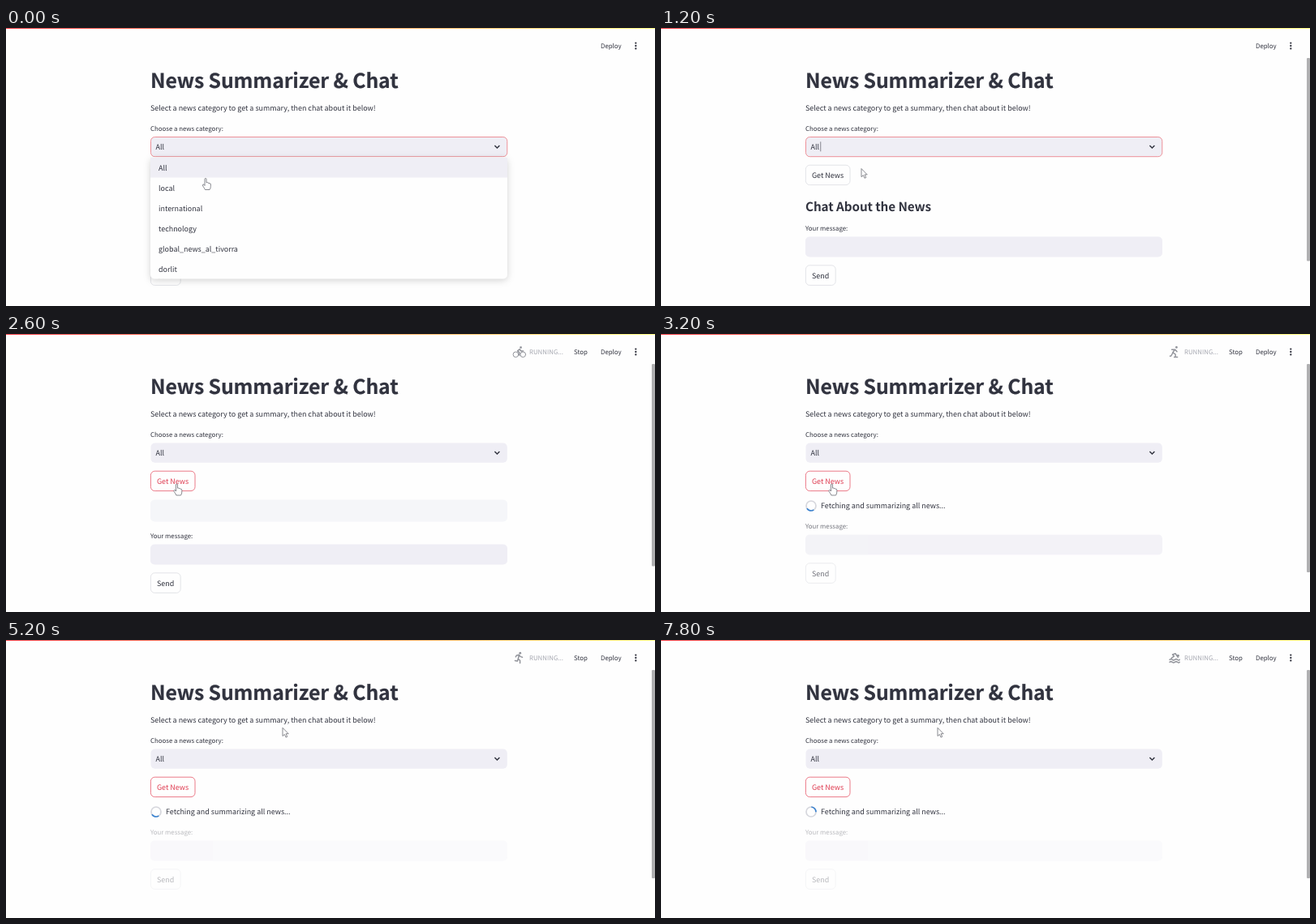
Write an HTML page that moves like this. It is 800x343 px and loops after 8000 ms.

```html
<!DOCTYPE html>
<html lang="en">
<head>
<meta charset="utf-8">
<title>News Summarizer &amp; Chat</title>
<style>
html, body { margin: 0; width: 100%; height: 100%; overflow: hidden; background: #fefefe; }
svg { display: block; width: 100%; height: 100%; }
text {
  font-family: "Noto Sans CJK JP", "Noto Sans CJK SC", "Noto Sans CJK", "Open Sans", sans-serif;
  font-size: 8.95px; fill: #31333f; text-rendering: geometricPrecision; white-space: pre;
}
.small { font-size: 7.83px; }
.title { font-size: 24.8px; font-weight: 700; letter-spacing: -.005em; stroke: #31333f; stroke-width: .2; }
.heading { font-size: 15.25px; font-weight: 600; letter-spacing: -.005em; }
.field { fill: #efeef5; }
.button { fill: #fefefe; stroke: #dcdde2; stroke-width: .8; }
.focus .field { stroke: #ec868e; stroke-width: .9; }
.hot .button { stroke: #e8596a; }
.hot text { fill: #df3d52; }
.menu { filter: drop-shadow(0 2.5px 4px rgba(0, 0, 0, .17)); }
.icon path { fill: none; stroke: #92949b; stroke-width: 1.5; stroke-linecap: round; stroke-linejoin: round; }
.icon .thin { stroke-width: 1; }
.icon circle { fill: #92949b; }
.pointer path { fill: #fff; stroke: #6b6c74; stroke-width: .8; stroke-linejoin: round; }
</style>
</head>
<body>
<svg viewBox="0 0 800 343" preserveAspectRatio="none">
  <defs>
    <linearGradient id="rainbow"><stop stop-color="#f5434b"/><stop offset="1" stop-color="#fffd80"/></linearGradient>
  </defs>
  <rect width="800" height="1" fill="url(#rainbow)"/>
  <text class="small" x="733" y="25">Deploy</text>
  <g fill="#31333f">
    <circle cx="776.3" cy="18.6" r="1.15"/><circle cx="776.3" cy="22" r="1.15"/><circle cx="776.3" cy="25.4" r="1.15"/>
  </g>
  <rect id="scrollbar" x="796" y="37" width="4" height="250" rx="1" fill="#b0b0b2"/>

  <g id="status">
    <g class="icon" id="bike">
      <path class="thin" d="M631.7 25.3a3.3 3.3 0 1 0-6.6 0a3.3 3.3 0 1 0 6.6 0M640.6 25.3a3.3 3.3 0 1 0-6.6 0a3.3 3.3 0 1 0 6.6 0"/>
      <path d="M632.8 26.2v-3.3l-2.2-2 2.4-2 2.2 2.2h2.4"/><circle cx="634.6" cy="16.6" r="1.4"/>
    </g>
    <g class="icon" id="runner">
      <path d="M628.3 20.8l1-1.8 3.3-.8-1.3 5 2.3 2v3.2M632.6 18.5c.8 1.7 2 2.6 3.9 2.8M631.2 23.4l-.8 2.5-3-.5"/>
      <circle cx="633.8" cy="16.2" r="1.4"/>
    </g>
    <g class="icon" id="swimmer">
      <path d="M627 24.2q1.6-1.4 3.2 0t3.2 0 3.2 0 2.6 0M627 27.3q1.6-1.4 3.2 0t3.2 0 3.2 0 2.6 0M629.5 22.2l3-2.2-2-2 3.6-1.2 3.2 4.6"/>
      <circle cx="637.4" cy="19.3" r="1.5"/>
    </g>
    <g class="icon" id="skater">
      <path d="M629.6 19.2h3.8l-2.5 3.6 3.2 2.2v3.6M634 19.5l2 2.3M631 23l-2.2 4-1.3.3M632.6 28.6h4"/>
      <circle cx="635.4" cy="16.4" r="1.4"/>
    </g>
    <text class="small" x="645" y="25" style="fill:#a5a7b0">RUNNING...</text>
    <text class="small" x="700" y="25">Stop</text>
  </g>

  <text class="title" x="178" y="73.8">News Summarizer &amp; Chat</text>
  <text x="178" y="101.6">Select a news category to get a summary, then chat about it below!</text>
  <text class="small" x="178" y="127">Choose a news category:</text>
  <g id="select">
    <rect class="field" x="178.5" y="134.5" width="439.3" height="24.2" rx="5"/>
    <text x="184.6" y="149.8">All</text>
    <path d="M602.4 145l3 3 3-3" fill="none" stroke="#31333f" stroke-width="1.4"/>
  </g>
  <rect id="caret" x="196.4" y="140.3" width=".8" height="12" fill="#6b6c74"/>

  <g id="getNews">
    <rect class="button" x="178.4" y="169.2" width="54.6" height="24.4" rx="5"/>
    <text x="185.9" y="184.6">Get News</text>
  </g>

  <text class="heading" id="heading" x="178" y="225.8">Chat About the News</text>
  <rect id="skeleton" x="178" y="204.5" width="440" height="27" rx="5" fill="#f5f6f9"/>
  <g id="spinner">
    <circle cx="185" cy="212" r="6" fill="none" stroke="#d6d7dd" stroke-width="1.7"/>
    <path id="arc" d="M189.24 207.76A6 6 0 0 1 189.24 216.24" fill="none" stroke="#3b83d0" stroke-width="1.7"/>
    <text x="197" y="215.4">Fetching and summarizing all news...</text>
  </g>

  <g id="form">
    <text class="small" x="178" y="250.4">Your message:</text>
    <rect class="field" x="178" y="257.5" width="440" height="25" rx="5"/>
    <rect class="button" x="178.4" y="292.8" width="36.8" height="24.6" rx="5"/>
    <text x="186" y="308.5">Send</text>
  </g>

  <g id="menu">
    <rect class="menu" x="178" y="159.5" width="440" height="150" rx="5" fill="#fefefe"/>
    <rect x="178" y="160" width="440" height="24.5" fill="#efeef5"/>
  </g>

  <g class="pointer" id="arrow"><path d="M0 0V10.2L2.4 8.1 4 11.8 5.7 11 4.1 7.4H7.2Z"/></g>
  <g class="pointer" id="hand">
    <path d="M-1 9V1Q-1 0 0 0T1 1V5.2Q2.6 4.4 3 5.8 4.4 5 4.8 6.4 6.3 5.9 6.3 7.4V10Q6.3 12 5 14H-.6Q-1.4 12-3.2 9.6-4.2 8-3 7.4-2 7.2-1 9Z"/>
  </g>
</svg>
<script>
const LOOP = 8000, STEP = 200;
const OPTIONS = ["All", "local", "international", "technology", "global_news_al_tivorra", "dorlit"];
const ICONS = ["runner", "bike", "runner", "swimmer", "skater", "bike"];
const POINTER_KEYS = [
  [0, 246, 185.5], [200, 246, 185.5], [600, 247, 173.5], [1400, 247, 173.5],
  [2000, 210.5, 185], [3400, 210.5, 185], [4000, 341, 108.3], [LOOP, 341, 108.3]
];

const get = id => document.getElementById(id);
const show = (id, on) => { get(id).style.display = on ? "" : "none"; };
const move = (id, x, y) => get(id).setAttribute("transform", `translate(${x} ${y})`);
const ramp = (t, from, to) => Math.min(1, Math.max(0, (t - from) / (to - from)));

OPTIONS.forEach((label, i) => {
  const item = document.createElementNS(get("menu").namespaceURI, "text");
  item.setAttribute("x", 188);
  item.setAttribute("y", 175.6 + 25 * i);
  item.textContent = label;
  get("menu").append(item);
});

function pointerAt(t) {
  const i = POINTER_KEYS.findIndex(key => key[0] > t);
  const [t0, x0, y0] = POINTER_KEYS[i - 1], [t1, x1, y1] = POINTER_KEYS[i];
  const k = ramp(t, t0, t1), eased = k * k * (3 - 2 * k);
  return [x0 + (x1 - x0) * eased, y0 + (y1 - y0) * eased];
}

function render(t) {
  const menuOpen = t < 600, running = t >= 2400, skeleton = t >= 2600 && t < 2800, fetching = t >= 2800;
  const [x, y] = pointerAt(t);
  const overButton = x > 178 && x < 233 && y > 169 && y < 194;

  show("menu", menuOpen);
  show("scrollbar", !menuOpen);
  get("scrollbar").setAttribute("height", fetching ? 257 : skeleton ? 249.5 : 250.5);
  get("select").classList.toggle("focus", t < 2200);
  show("caret", t >= 1000 && t < 1600);
  get("getNews").classList.toggle("hot", overButton || running);

  show("heading", t < 2600);
  show("skeleton", skeleton);
  show("spinner", fetching);
  get("arc").setAttribute("transform", `rotate(${t * .36 + 30} 185 212)`);
  move("form", 0, fetching ? -10 : skeleton ? 2 : 0);
  get("form").style.opacity = 1 - .67 * ramp(t, 2800, 3600);

  show("status", running);
  const icon = ICONS[Math.floor(t / STEP) % ICONS.length];
  new Set(ICONS).forEach(id => show(id, id === icon));

  const hand = menuOpen || overButton;
  show("hand", hand);
  show("arrow", !hand);
  move(hand ? "hand" : "arrow", x, y);
}

const start = performance.now();
function tick() {
  const t = (performance.now() - start) % LOOP;
  render(Math.floor(t / STEP) * STEP);
  requestAnimationFrame(tick);
}
tick();
</script>
</body>
</html>
```
